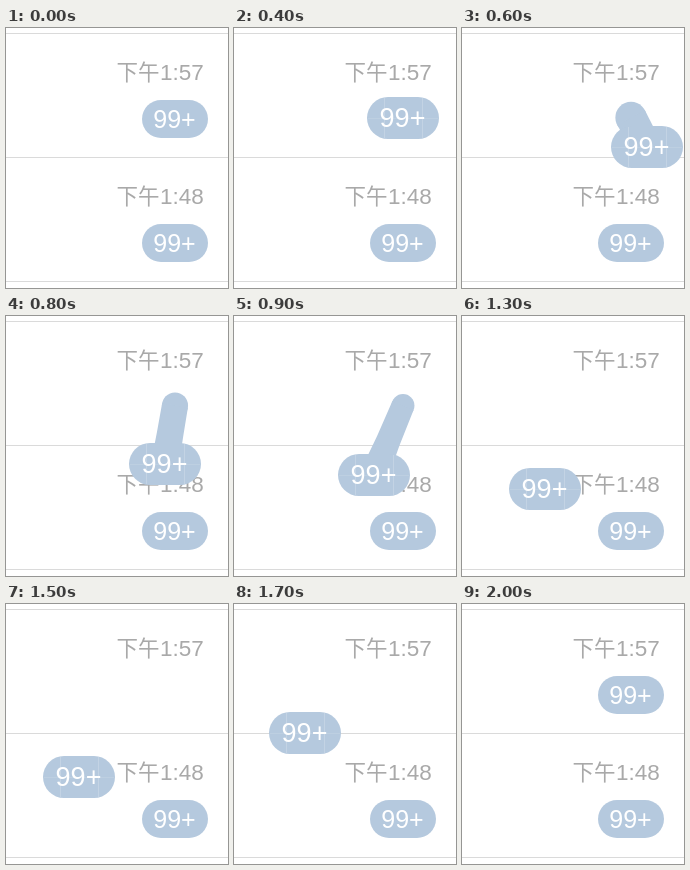
An HTML page with a canvas for the animation above (2400 ms loop, 222x260 px).

```html
<!DOCTYPE html>
<html lang="zh">
<head>
<meta charset="utf-8">
<style>
html, body { margin: 0; width: 100%; height: 100%; overflow: hidden; background: #fff; }
canvas { display: block; width: 222px; height: 260px; }
</style>
</head>
<body>
<canvas id="stage" width="222" height="260"></canvas>
<script>
const ctx = document.getElementById('stage').getContext('2d');
const LOOP = 2400, STEP = 100, DRAG_START = 400, DRAG_END = 2000;
const BLUE = '#b5c9de', GRAY = '#a9a9a9', RULE = '#dadada';
const SANS = '"Liberation Sans", Arial, sans-serif';
const CJK = '"Noto Sans CJK SC", "Noto Sans CJK", sans-serif';
const ANCHOR = { x: 169, y: 89.5 };
const SNAP = 118;

// Finger position at each step of the drag
const PATH = [
  [169, 90], [181, 104], [185, 119], [176, 134], [159, 148], [140, 159],
  [123, 167], [106, 172], [92, 173], [83, 173], [77, 173], [73, 173],
  [67, 152], [71, 129], [91, 112], [131, 99]
];

function text(str, x, y, font, color, align) {
  ctx.font = font;
  ctx.fillStyle = color;
  ctx.textAlign = align;
  ctx.fillText(str, x, y);
}

function badge(x, y, w, h, size) {
  ctx.fillStyle = BLUE;
  ctx.beginPath();
  ctx.roundRect(x - w / 2, y - h / 2, w, h, h / 2);
  ctx.fill();
  text('99+', x - 0.5, y + size * 0.35, size + 'px ' + SANS, '#fff', 'center');
}

function row(top, time) {
  text('下午', 110.5, top + 47, '300 21.5px ' + CJK, GRAY, 'left');
  text(time, 197.8, top + 47, '22.5px ' + SANS, GRAY, 'right');
}

// Sticky tail: shrinking disc at home, joined to the badge by two curves
function tail(x, y) {
  const dx = x - ANCHOR.x, dy = y - ANCHOR.y;
  const d = Math.hypot(dx, dy);
  if (d > SNAP) return;
  const r = 19 - d / 10, R = 14;
  ctx.fillStyle = BLUE;
  ctx.beginPath();
  ctx.arc(ANCHOR.x, ANCHOR.y, r, 0, Math.PI * 2);
  ctx.fill();
  if (d < 2) return;
  const nx = -dy / d, ny = dx / d;
  const ax = ANCHOR.x + nx * r, ay = ANCHOR.y + ny * r;
  const bx = ANCHOR.x - nx * r, by = ANCHOR.y - ny * r;
  ctx.beginPath();
  ctx.moveTo(ax, ay);
  ctx.quadraticCurveTo(ax + dx / 2, ay + dy / 2, x + nx * R, y + ny * R);
  ctx.lineTo(x - nx * R, y - ny * R);
  ctx.quadraticCurveTo(bx + dx / 2, by + dy / 2, bx, by);
  ctx.fill();
}

function dragged(x, y, sticky) {
  if (sticky) tail(x, y);
  badge(x, y, 72, 42, 27);
  // Faint seams of the stretched badge
  ctx.fillStyle = 'rgba(255,255,255,0.2)';
  ctx.fillRect(x - 19, y - 20, 1, 40);
  ctx.fillRect(x + 19, y - 20, 1, 40);
  ctx.fillStyle = 'rgba(255,255,255,0.1)';
  ctx.fillRect(x - 35, y, 70, 1);
}

function draw(t) {
  ctx.fillStyle = '#fff';
  ctx.fillRect(0, 0, 222, 260);
  ctx.fillStyle = RULE;
  for (const y of [5, 129, 253]) ctx.fillRect(0, y, 222, 1);
  row(5, '1:57');
  row(129, '1:48');
  badge(169, 215, 66, 38, 25);
  if (t < DRAG_START || t >= DRAG_END) {
    badge(169, 91, 66, 38, 25);
  } else {
    const i = Math.floor((t - DRAG_START) / STEP);
    dragged(...PATH[i], i < 9);
  }
}

const start = performance.now();
function tick() {
  draw((performance.now() - start) % LOOP);
  requestAnimationFrame(tick);
}
tick();
</script>
</body>
</html>
```
